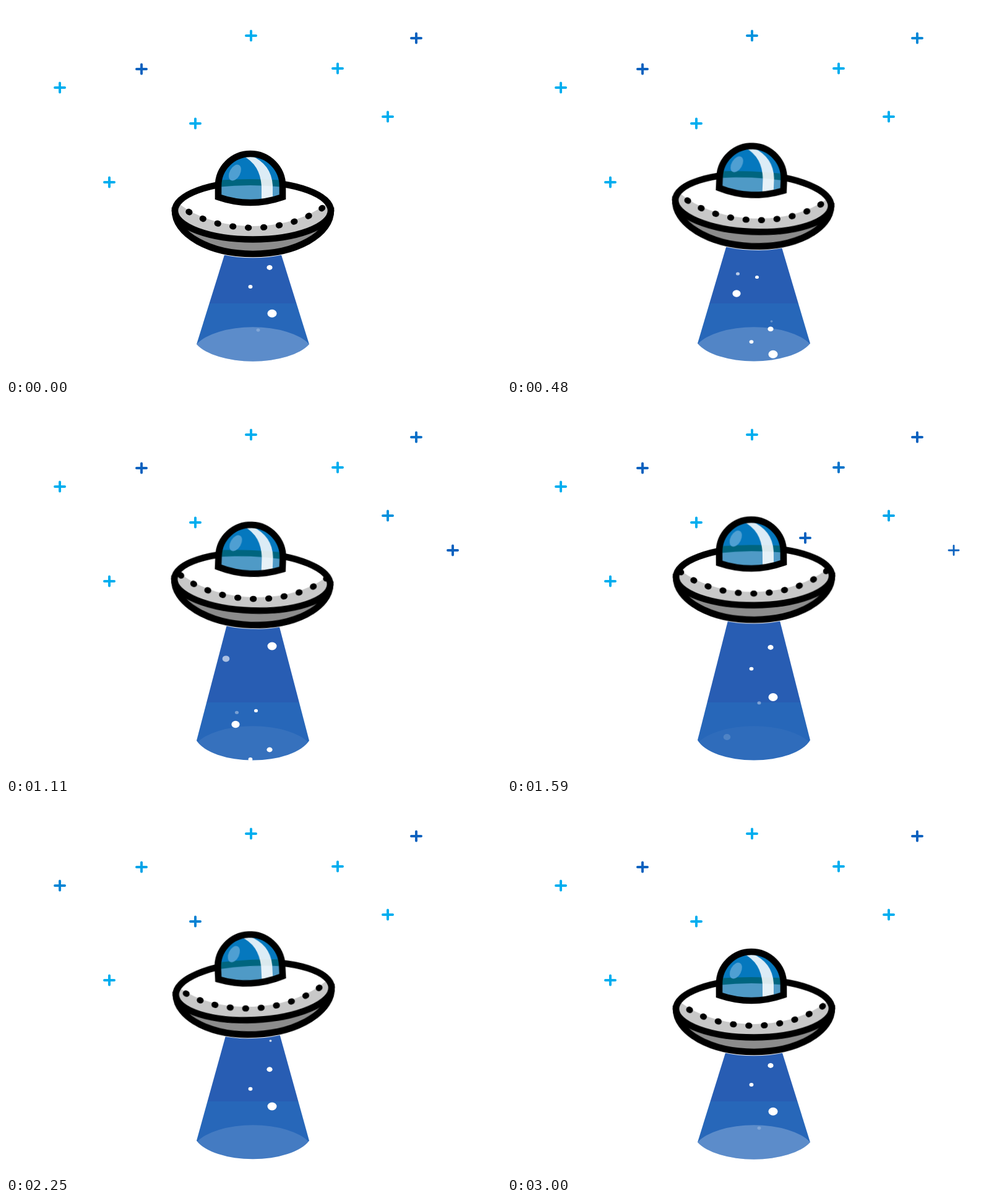
An HTML page for the animation above (3030 ms loop, 800 by 600 pixels).

```html
<!DOCTYPE html>
<html lang="en">
<head>
<meta charset="utf-8">
<title>Flying saucer</title>
<style>
html, body { margin: 0; width: 100%; height: 100%; overflow: hidden; background: #fff; }
svg { display: block; width: 800px; height: 600px; }

/* cubic-bezier(.364,0,.636,1) follows a sine wave */
.hover, .tilt, .beam, .pool {
  animation: 1515ms cubic-bezier(.364, 0, .636, 1) infinite alternate;
}
.hover { animation-name: hover; }
.tilt { animation-name: tilt; animation-delay: -757.5ms; transform-origin: 399px 305px; }
.beam { animation-name: beam; }
.pool { animation-name: pool; }
.lights { animation: lights 3030ms linear infinite; }

@keyframes hover { to { transform: translateY(-54px); } }
@keyframes tilt { from { transform: rotate(-2.85deg); } to { transform: rotate(2.85deg); } }
@keyframes beam {
  from { d: path("M356 393H442L490 547A98 44 0 0 1 308 547Z"); }
  to { d: path("M359.5 339H438.5L490 542A94.2 44 0 0 1 308 542Z"); }
}
@keyframes pool { from { opacity: .245; } to { opacity: .035; } }
@keyframes lights { from { stroke-dashoffset: 1.75; } to { stroke-dashoffset: 179.5; } }
</style>
</head>
<body>
<svg viewBox="0 0 800 600">
  <defs>
    <linearGradient id="ray" gradientUnits="userSpaceOnUse" x1="0" y1="0" x2="0" y2="600">
      <stop offset=".8017" stop-color="#285db3"/>
      <stop offset=".8017" stop-color="#2767b9"/>
    </linearGradient>
    <clipPath id="inDisc"><ellipse cx="399" cy="331" rx="126" ry="46.5"/></clipPath>
    <path id="hull" d="M273 331A126 70 0 0 0 525 331Z"/>
    <path id="glass" d="M343 309V291A52 52 0 0 1 447 291V309Q395 327 343 309Z"/>
    <clipPath id="inGlass"><use href="#glass"/></clipPath>
  </defs>

  <g id="stars" fill="none" stroke-width="4" stroke-linecap="round"></g>

  <path class="beam" fill="url(#ray)" d="M356 393H442L490 547A98 44 0 0 1 308 547Z"/>
  <path class="pool" fill="#fff" d="M308 547A98 44 0 0 1 490 547A98 44 0 0 1 308 547Z"/>
  <g id="bubbles" fill="#fff"></g>

  <g class="hover"><g class="tilt" stroke-width="10.6">
    <use href="#hull" fill="none" stroke="#fff" stroke-width="12.5"/>
    <use href="#hull" fill="#8c8c8c" stroke="#000"/>
    <g clip-path="url(#inDisc)">
      <rect x="270" y="280" width="260" height="100" fill="#c8c8c8"/>
      <ellipse cx="398.5" cy="263" rx="150" ry="93" fill="#fff"/>
    </g>
    <path class="lights" d="M276.5 319.3A150 94 0 0 0 520.5 319.3" fill="none" stroke="#000"
      stroke-width="9.8" stroke-linecap="round" stroke-dasharray="1.5 23.5"/>
    <ellipse cx="399" cy="331" rx="126" ry="46.5" fill="none" stroke="#000"/>
    <g clip-path="url(#inGlass)">
      <rect x="340" y="235" width="110" height="90" fill="#0578be"/>
      <path d="M340 282Q395 278 450 282V325H340Z" fill="#00657f"/>
      <path d="M340 293Q395 287 450 293V325H340Z" fill="#4f9ac6"/>
      <path d="M382 242Q411 256 413 292V320H431V290Q429 256 396 242Z" fill="#fff" opacity=".86"/>
      <ellipse cx="370" cy="269.5" rx="8.5" ry="14" transform="rotate(28 370 269.5)" fill="#4f9fd2"/>
    </g>
    <use href="#glass" fill="none" stroke="#000"/>
  </g></g>
</svg>
<script>
const LOOP = 3030, CYCLE = 1500, FLOOR = 580;
const LIGHT = '#00aeef', DARK = '#0c62bf';

function add(parent, tag, attrs) {
  const el = document.createElementNS('http://www.w3.org/2000/svg', tag);
  for (const key in attrs) el.setAttribute(key, attrs[key]);
  return document.getElementById(parent).appendChild(el);
}

// x, y, resting state, start and end of its change in ms
const stars = [
  [396, 48, 'light', 360, 1080],
  [663, 52, 'dark', 240, 1200],
  [219, 102, 'dark', 1770, 2610],
  [87, 132, 'light', 1770, 2430],
  [536, 101, 'light', 1140, 1860],
  [306, 190, 'light', 2070, 2700],
  [617, 179, 'light', 990, 1620],
  [167, 285, 'light'],
  [722, 235, 'hidden', 990, 1745],
  [482, 215, 'hidden', 1470, 2220]
];

// Holds the rest pose outside the given steps of [ms, pose].
function loop(el, rest, steps) {
  const frames = steps.map(([ms, pose]) => ({ ...pose, offset: ms / LOOP }));
  el.animate([{ ...rest, offset: 0 }, ...frames, { ...rest, offset: 1 }],
    { duration: LOOP, iterations: Infinity });
}

for (const [x, y, state, start, end] of stars) {
  const isLight = state === 'light';
  const el = add('stars', 'path', {
    d: `M${x - 8} ${y}h16M${x} ${y - 7.5}v15`,
    stroke: isLight ? LIGHT : DARK
  });
  if (state === 'hidden') {
    const off = { opacity: 0, strokeWidth: 2.6 };
    const thin = { opacity: 1, strokeWidth: 2.6 };
    const full = { opacity: 1, strokeWidth: 4 };
    loop(el, off, [
      [start, off], [start + 30, thin], [start + 110, full],
      [end - 210, full], [end - 140, thin], [end - 60, off]
    ]);
  } else if (end) {
    const rest = { stroke: isLight ? LIGHT : DARK };
    const peak = { stroke: isLight ? DARK : LIGHT };
    loop(el, rest, [[start, rest], [(start + end) / 2, peak], [end, rest]]);
  }
}

// x, radius, speed in px per ms, two start times, fades in
const bubbles = [
  [430, 7.5, .275, 1199, 419],
  [426, 4.6, .345, 1045, 313],
  [395, 3.4, .305, 1087, 359],
  [407.5, 3, .47, 1381, 0, true],
  [427.5, 2, .47, 331, 0, true],
  [373, 3, .42, 130, 913, true],
  [404, 3, .43, 151, 911],
  [371, 6.6, .355, 156, 931],
  [355.5, 5.8, .53, 790, 9, true]
].flatMap(([x, r, speed, first, second, fades]) =>
  [first, second].filter(Boolean).map(start => ({
    start, speed, fades,
    el: add('bubbles', 'ellipse', { cx: x, rx: r, ry: r * .86 })
  })));

let origin;
function draw(now) {
  origin ??= now;
  const time = (now - origin) % LOOP;
  for (const { el, start, speed, fades } of bubbles) {
    const age = (time - start + CYCLE * 2) % CYCLE;
    const y = FLOOR - speed * age;
    el.setAttribute('cy', y);
    el.setAttribute('opacity', y < 320 ? 0 : fades ? Math.min(1, age / 520) : 1);
  }
  requestAnimationFrame(draw);
}
requestAnimationFrame(draw);
</script>
</body>
</html>
```
